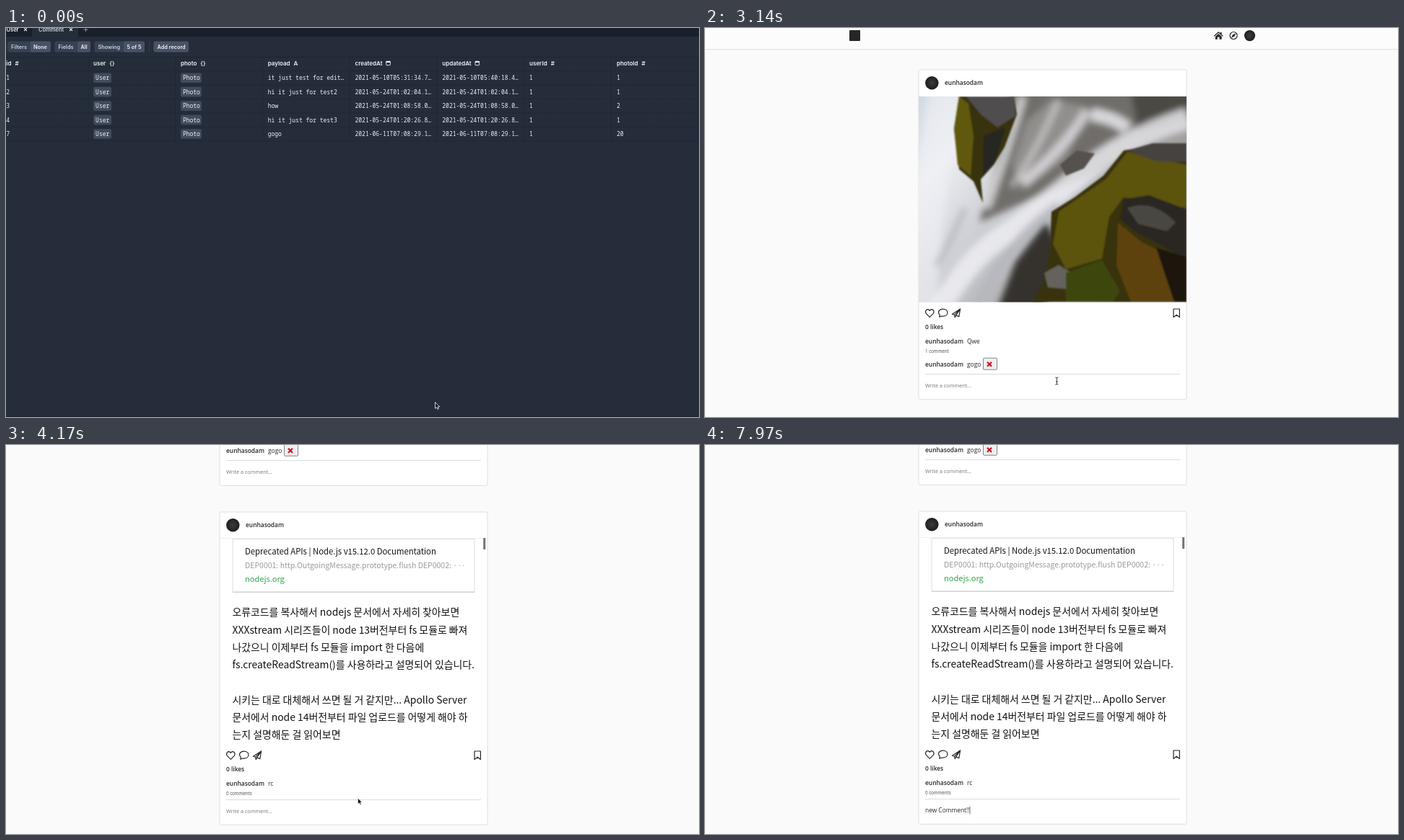
Animation, 960 px wide and 540 px high, one loop 8000 ms. Source, as an HTML page:

```html
<!DOCTYPE html>
<html lang="en">
<head>
<meta charset="utf-8">
<title>Comment demo</title>
<style>
  html, body { margin: 0; width: 100%; height: 100%; overflow: hidden; background: #fafafa; }
  svg { display: block; }
  text { white-space: pre; }
  #table { font: 600 8px Inter, sans-serif; fill: #edf2f7; }
  .tool { font-size: 7.3px; }
  .mono { font: 500 8px "Noto Sans Mono", monospace; }
  #feed, #overlay { font: 8.4px "Open Sans", sans-serif; fill: #262626; }
  .bold { font-weight: 600; }
  .small { font-size: 6.2px; fill: #444; }
  .hint { font-size: 7.25px; fill: #757575; }
  .article { font: 300 13.9px "Noto Sans CJK KR", "Noto Sans CJK", sans-serif; fill: #111; }
  .line { fill: none; stroke: #262626; stroke-width: 1.2; stroke-linejoin: round; stroke-linecap: round; }
</style>
</head>
<body>
<svg id="stage" width="960" height="540" viewBox="0 0 960 540">
  <defs>
    <radialGradient id="ball"><stop stop-color="#3c3c3c"/><stop offset=".65" stop-color="#2a2a2a"/><stop offset="1" stop-color="#1c1c1c"/></radialGradient>
    <linearGradient id="water" x1="0" y1="0" x2="1" y2=".6"><stop stop-color="#cfd8e2"/><stop offset=".2" stop-color="#eef0f4"/><stop offset=".5" stop-color="#c6c8ce"/><stop offset="1" stop-color="#8b8782"/></linearGradient>
    <clipPath id="frame"><rect x="296" y="95" width="371" height="285.5"/></clipPath>
    <filter id="soft" x="-20%" y="-20%" width="140%" height="140%"><feGaussianBlur stdDeviation="5"/></filter>
    <filter id="edge"><feGaussianBlur stdDeviation="1"/></filter>
  </defs>
  <g id="table"></g>
  <g id="feed"></g>
  <g id="overlay">
    <rect id="blank" x="304.5" y="496" width="354" height="20" fill="#fff"/>
    <text id="typed" x="305" y="510"></text>
    <text id="hint" class="hint" x="305" y="510">Write a comment...</text>
    <path id="caret" stroke="#555" stroke-width=".8"/>
    <g id="menu"><rect x="305" y="514" width="116" height="40" rx="2.5" fill="#24272b"/>
      <text x="312" y="532" font-size="8" font-weight="700" fill="#fff">gogo</text></g>
  </g>
  <path id="arrow" d="M0 0V8.6L2 6.9 3.3 9.8 4.8 9.1 3.5 6.3H6.2Z" fill="#111" stroke="#fff" stroke-width=".8"/>
  <path id="beam" d="M-2-5Q0-5 0-4Q0-5 2-5M0-4V4M-2 5Q0 5 0 4Q0 5 2 5M-1.2 1H1.2" fill="none" stroke="#222" stroke-width=".9"/>
</svg>
<script>
const LOOP = 8000, USER = 'eunhasodam';
const $ = id => document.getElementById(id);
const text = (x, y, s, cls = '', extra = '') => `<text x="${x}" y="${y}" class="${cls}" ${extra}>${s}</text>`;
const rect = (x, y, w, h, fill, extra = '') => `<rect x="${x}" y="${y}" width="${w}" height="${h}" fill="${fill}" ${extra}/>`;
const path = (d, fill, extra = '') => `<path d="${d}" fill="${fill}" ${extra}/>`;
const stroke = (d, color, extra = '') => path(d, 'none', `stroke="${color}" ${extra}`);
const cross = (x, y, r, color, w) => stroke(`M${x - r} ${y - r}l${2 * r} ${2 * r}m0 ${-2 * r}l${-2 * r} ${2 * r}`, color, `stroke-width="${w}"`);
const avatar = (x, y, r) => `<circle cx="${x}" cy="${y}" r="${r}" fill="url(#ball)"/>`;

function buildTable() {
  const pill = (x, split, end, label, value) =>
    rect(x, 18.5, end - x, 15, '#384152', 'rx="2.5"') +
    rect(split, 18.5, end - split, 15, '#485264', 'rx="2.5"') +
    text(x + 5, 28.7, label, 'tool', 'fill="#cbd5e0"') + text(split + 4.5, 28.7, value, 'tool');
  const columns = [['id', '#'], ['user', '{}'], ['photo', '{}'], ['payload', 'A'],
    ['createdAt', ''], ['updatedAt', ''], ['userId', '#'], ['photoId', '#']];
  const rows = [
    [1, 'it just test for edit…', '2021-05-10T05:31:34.7…', '2021-05-10T05:40:18.4…', 1],
    [2, 'hi it just for test2', '2021-05-24T01:02:04.1…', '2021-05-24T01:02:04.1…', 1],
    [3, 'how', '2021-05-24T01:08:58.0…', '2021-05-24T01:08:58.0…', 2],
    [4, 'hi it just for test3', '2021-05-24T01:20:26.8…', '2021-05-24T01:20:26.8…', 1],
    [7, 'gogo', '2021-06-11T07:08:29.1…', '2021-06-11T07:08:29.1…', 20]];
  const colX = i => 0.3 + 120.8 * i;
  const calendar = x => rect(x, 46.3, 5.6, 5.4, 'none', 'rx=".8" stroke="#edf2f7" stroke-width=".9"') + rect(x, 46, 5.6, 2, '#edf2f7');

  let out = rect(0, 0, 960, 540, '#252c3a') + rect(0, 0, 960, 12, '#19202c') + rect(36, 0, 64, 12, '#252c3a') +
    text(0.5, 5, 'User', '', 'font-size="7.5"') + text(45, 5, 'Comment', '', 'font-size="7.5" fill="#cbd5e0"') +
    cross(27, 2.2, 2, '#edf2f7', 1.1) + cross(90, 2.2, 2, '#edf2f7', 1.1) +
    stroke('M107.5 2.2h6m-3-3v6', '#8490a3') +
    pill(2, 33.5, 62, 'Filters', 'None') + pill(67.5, 99, 117, 'Fields', 'All') +
    pill(122.5, 163, 192, 'Showing', '5 of 5') +
    stroke('M198.5 18V34', '#303949') + rect(204.5, 18.5, 48.5, 15, '#485264', 'rx="2.5"') + text(209.5, 28.7, 'Add record', 'tool') +
    stroke('M0 40.5H960', '#1c2331') + stroke('M0 539.3H960', '#19202c');
  columns.forEach(([name, icon], i) => {
    out += text(colX(i), 52, `${name}<tspan dx="5">${icon}</tspan>`) +
      stroke(`M${114 + 120.7 * i} 41V157`, '#1d2431', 'stroke-width=".8" stroke-dasharray="1.5 1"');
  });
  out += calendar(526.7) + calendar(650);
  rows.forEach(([id, payload, created, updated, photo], r) => {
    const y = 72.4 + 19.45 * r;
    const chip = (i, label, w) => rect(colX(i), y - 10, w, 13.6, '#414b5c', 'rx="2.5"') + text(colX(i) + 3, y, label, 'mono');
    out += stroke(`M0 ${y - 12.8}H960`, '#1d2431', 'stroke-width=".8" stroke-dasharray="1.5 1"') +
      text(0.3, y, id, 'mono') + chip(1, 'User', 25) + chip(2, 'Photo', 29);
    [payload, created, updated, 1, photo].forEach((v, i) => out += text(colX(i + 3), y, v, 'mono'));
  });
  return out + stroke('M0 156.8H960', '#1d2431', 'stroke-width=".8" stroke-dasharray="1.5 1"');
}

function waterfall() {
  const white = (d, w, o) => stroke(d, '#f1f1f5', `stroke-width="${w}" opacity="${o}"`);
  return `<g clip-path="url(#frame)">` + rect(296, 95, 371, 286, 'url(#water)') +
    `<g filter="url(#soft)">` +
    path('M425 85H680V135L560 195 480 225 380 270 400 200Z', '#716e6a') +
    path('M425 190L445 130 480 100 530 110 500 180 440 225Z', '#918e8c') +
    path('M590 90H680V122L600 145Z', '#4c4843') +
    path('M472 270L430 325 405 390H470L490 300Z', '#35322d') +
    white('M440 95Q425 150 390 250', 11, .7) + white('M490 100Q460 170 425 220', 9, .45) +
    white('M530 115Q500 165 440 215', 14, .65) + white('M535 120Q570 125 585 140', 18, .8) +
    white('M670 125Q580 155 520 205T410 290 320 400', 30, .8) + white('M330 90Q310 240 300 390', 40, .6) +
    stroke('M490 245Q420 290 375 390', '#b5b6bf', 'stroke-width="10" opacity=".8"') +
    stroke('M360 250Q335 310 320 330', '#aeb2ba', 'stroke-width="10" opacity=".6"') + '</g>' +
    `<g filter="url(#edge)">` +
    path('M352 95H428L432 120 415 165 400 190 382 210 385 243 372 213 352 196 345 140Z', '#37320f') +
    path('M352 95L365 105 372 150 368 205 350 190 345 140Z', '#605810') +
    path('M362 95H428L430 122 405 138 382 120Z', '#504e4d') +
    path('M386 150L416 138 402 185 385 205Z', '#282523') +
    path('M492 190L515 170 540 174 525 195 500 205Z', '#55514d') +
    path('M580 170L620 163 667 182V380H455L472 345 478 300 480 255 512 235 552 205Z', '#37320f') +
    path('M555 210L585 172 667 190V250L612 240 580 235 560 262 550 320 500 335 482 300 490 255Z', '#5b5311') +
    path('M585 170L620 160 667 160V186L625 185Z', '#45423f') +
    path('M580 238L615 232 667 252V322L630 300 600 285 575 265Z', '#292724') +
    path('M585 250Q620 236 652 270L640 282 600 272Z', '#494642') +
    path('M572 270L606 298 667 326V380H590L570 330Z', '#5d420a') +
    path('M625 305L667 318V380H650Z', '#1c170d') +
    path('M470 340L490 329 516 345 510 363 475 360Z', '#65625d') +
    path('M500 340L550 322 575 365 565 380H500Z', '#3d470f') + '</g></g>';
}

const article = () => {
  const lines = ['오류코드를 복사해서 nodejs 문서에서 자세히 찾아보면', 'XXXstream 시리즈들이 node 13버전부터 fs 모듈로 빠져',
    '나갔으니 이제부터 fs 모듈을 import 한 다음에', 'fs.createReadStream()를 사용하라고 설명되어 있습니다.', '',
    '시키는 대로 대체해서 쓰면 될 거 같지만... Apollo Server', '문서에서 node 14버전부터 파일 업로드를 어떻게 해야 하', '는지 설명해둔 걸 읽어보면'];
  return stroke('M296 588.5H667', '#efefef') +
    rect(314, 589.7, 335, 73, '#fff', 'stroke="#dedede"') + stroke('M314 663.5H649', '#d4d4d4') +
    text(331, 611.2, 'Deprecated APIs | Node.js v15.12.0 Documentation', 'article', 'style="font-size:11.3px"') +
    text(331, 629.7, 'DEP0001: http.OutgoingMessage.prototype.flush DEP0002: ···', 'article', 'style="font-size:10.5px;fill:#999"') +
    text(331, 648.7, 'nodejs.org', 'article', 'style="font-size:11.1px;fill:#36a64f"') +
    lines.map((s, i) => text(313.5, 696.3 + 24.3 * i, s, 'article')).join('') +
    rect(661.2, 588, 3, 16, '#737373', 'rx=".8"');
};

function post(top, bottom, picture, shift, caption, count, comment) {
  const rule = bottom - 34.8;
  const icons = 'M311.3 401.3L306.6 396.6C303.8 393.3 308 387.8 311.3 392.3C314.6 387.8 318.8 393.3 316 396.6Z' +
    'M324.8 401.2L325.3 398.4C320.6 393 326.5 390.2 329.5 390.2C338 390.2 338 400.2 329.5 400.2L327.7 400Z' +
    'M342.4 397.2L353.6 390 351.8 400.6 347.7 398.9 346.2 401.6 345.7 398.2ZM345.7 398.2L353.6 390 347.7 398.9' +
    'M649 390H657.4V401.4L653.2 398.2 649 401.4Z';
  return rect(296, top, 371, bottom - top, '#fff', 'rx="2" stroke="#dfdfdf"') + avatar(314.3, top + 18.3, 9.2) +
    text(332, top + 21.2, USER, 'bold') + picture +
    `<g transform="translate(0 ${shift})"><path class="line" d="${icons}"/>` + text(305, 417.5, '0 likes', 'bold') +
    text(305, 438.2, USER, 'bold') + text(363, 438.2, caption) + text(305, 451, count, 'small') + '</g>' + comment +
    stroke(`M305 ${rule}H658`, '#dcdcdc') + text(305, rule + 18.8, 'Write a comment...', 'hint');
}

function buildFeed() {
  const comment = text(305, 469.6, USER, 'bold') + text(363, 469.6, 'gogo') +
    rect(385.5, 458.2, 19, 16, '#efefef', 'rx="1" stroke="#858585"') + cross(394, 466.8, 3, '#cf1020', 2.2);
  const header = rect(0, -20, 960, 50, '#fcfcfc') + stroke('M0 29.8H960', '#dcdcdc') +
    rect(200, 3, 15, 15, '#262626', 'rx="1"') +
    path('M704.8 10.8L711.3 5 713.8 7.2V5.8H715.6V8.8L717.8 10.8 717 11.7 711.3 6.8 705.6 11.7ZM707 11.7L711.3 8 715.7 11.7V15.8H712.6V12.6H710V15.8H707Z', '#262626') +
    '<circle cx="732.2" cy="10.5" r="5" class="line"/>' + path('M735.3 7.4L733.5 11.7 729.1 13.6 731 9.3Z', '#262626') +
    avatar(754.6, 10.6, 7.6);
  return header + post(58, 515.3, waterfall(), 0, 'Qwe', '1 comment', comment) +
    post(552, 986.3, article(), 494, 'rc', '0 comments', '');
}

const hold = (keys, t) => keys.filter(k => k[0] <= t).pop()[1];
function glide(keys, t) {
  const i = keys.findIndex(k => k[0] > t);
  if (i < 0) return keys[keys.length - 1].slice(1);
  const [a, b] = [keys[i - 1], keys[i]], u = (t - a[0]) / (b[0] - a[0]);
  return [1, 2].map(n => a[n] + (b[n] - a[n]) * u);
}

const scrollSteps = [[0, -9], [3040, -7], [3070, -4], [3140, 0], [3240, 100], [3310, 235], [3370, 349], [3440, 372],
  [3670, 400], [3770, 448], [3870, 453], [3970, 456], [4070, 458], [4170, 459], [4270, 460]];
const pointerPath = [[0, 594.5, 519.5], [130, 594.5, 519.5], [370, 251, 54], [570, 360, 203], [730, 360, 203], [870, 358, 175],
  [1270, 358, 175], [1430, 498, 94], [1770, 436, 80], [1969, 436, 80], [1970, 677, 245], [2170, 677, 245], [2400, 728, 300],
  [2720, 310, 440], [2940, 487.3, 490], [4440, 487.3, 490], [4800, 470, 502]];
const pointerKind = [[0, 'arrow'], [1430, ''], [1770, 'arrow'], [2900, 'beam'], [3670, 'arrow'], [4570, 'beam'], [5040, '']];
const typing = [[0, 0], [5370, 1], [5440, 2], [5540, 3], [5570, 4], [5940, 5], [6040, 6], [6270, 7], [6440, 8],
  [6540, 9], [6610, 10], [6670, 11], [7070, 12], [7440, 13]];
const caretOn = [[0, 0], [4770, 1], [5170, 0], [5370, 1], [6740, 0], [7070, 1], [7640, 0], [7970, 1]];
const show = (id, on) => $(id).style.display = on ? '' : 'none';

function draw(t) {
  const feed = t >= 1770;
  show('table', !feed);
  show('feed', feed);
  $('feed').setAttribute('transform', `translate(0 ${-hold(scrollSteps, t)})`);

  const count = hold(typing, t);
  show('overlay', t >= 4770);
  show('hint', !count);
  show('menu', t >= 4840 && t < 5370);
  show('caret', hold(caretOn, t));
  $('typed').textContent = 'new Comment!!'.slice(0, count);
  const end = t >= 4770 && count ? $('typed').getComputedTextLength() : 0;
  $('caret').setAttribute('d', `M${305.5 + end} 501.5V512.5`);

  const kind = hold(pointerKind, t), [x, y] = glide(pointerPath, t);
  for (const id of ['arrow', 'beam']) {
    show(id, id === kind);
    $(id).setAttribute('transform', `translate(${x} ${y})`);
  }
}

$('table').innerHTML = buildTable();
$('feed').innerHTML = buildFeed();
const start = performance.now();
function tick() {
  draw((performance.now() - start) % LOOP);
  requestAnimationFrame(tick);
}
tick();
</script>
</body>
</html>
```
